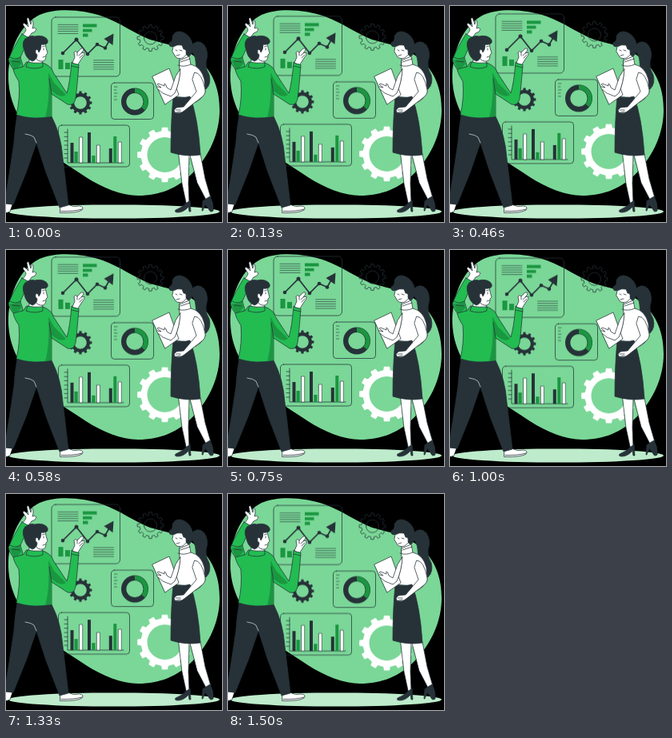
Write an HTML page that moves like this. It is 270 px wide and 270 px high and loops after 1540 ms.

```html
<!DOCTYPE html>
<html lang="en">
<head>
<meta charset="utf-8">
<title>Data presentation</title>
<style>
  html, body { margin: 0; width: 100%; height: 100%; overflow: hidden; background: #000; }
  svg { display: block; width: 100%; height: 100%; }
  .ink { fill: #263238; }
  .leaf { fill: #1b9641; }
  .shirt { fill: #22bc51; }
  .white { fill: #fff; }
  .none { fill: none; }
  .line { stroke: #263238; stroke-width: .75; stroke-linecap: round; stroke-linejoin: round; }
  .thin { stroke-width: .6; }
  .float { animation: float 1540ms linear -60ms infinite; }
  @keyframes float {
    0%, 100% { transform: translateY(.5px); }
    50% { transform: translateY(-6.4px); }
  }
</style>
</head>
<body>
<svg viewBox="0 0 270 270">
  <path fill="#7ad797" d="M3 85C4 53 18 23 42 11C62 2 96 4 121 13C143 21 158 33 180 42C202 48 226 52 244 70C261 86 267 108 267 130C267 158 255 186 234 208C215 228 192 237 165 237C145 237 120 227 100 214C76 198 52 184 34 164C15 141 2 116 3 85Z"/>
  <ellipse cx="135" cy="257" rx="132" ry="8.6" fill="#bdebcb"/>

  <g class="float">
    <path id="gearDark" class="ink" fill-rule="evenodd"/>
    <path id="gearWhite" class="white" fill-rule="evenodd"/>
    <path id="gearLine" class="none line"/>

    <rect class="none line" x="57" y="14" width="85.500" height="74" rx="5"/>
    <path class="none line thin" d="M65 23.300H90M65 26.100H90M65 28.900H90M65 31.700H90M65 34.500H90M109.500 67.800H134.500M109.500 70.600H134.500M109.500 73.400H134.500M109.500 76.200H134.500M109.500 79H134.500"/>
    <path class="leaf" d="M96 22.500H113.500V26.500H96ZM96 28.700H107.500V32.500H96ZM96 34.500H102.500V38.500H96ZM65.500 67H71.500V79H65.500ZM74 71H80V79H74Z"/>
    <path class="none" stroke="#263238" stroke-width="1.700" d="M71 59L88 42L102 60L114 48L124 52.500L131 40"/>
    <path class="ink" d="M134.500 34.500L122.500 41L133.500 49Z"/>
    <g class="ink">
      <circle cx="71" cy="59" r="2.300"/><circle cx="88" cy="42" r="2.500"/>
      <circle cx="102" cy="60" r="2.300"/><circle cx="114" cy="48" r="2.300"/>
      <circle cx="124" cy="52.500" r="2.300"/>
    </g>

    <rect class="none line" x="131.500" y="96" width="53" height="45.500" rx="4"/>
    <path class="none line thin" d="M135.500 101H139M135.500 105H138M135.500 109H139M135.500 113H138M135.500 117H138.500"/>
    <circle class="none" cx="161" cy="119.500" r="13.800" stroke="#263238" stroke-width="6.400"/>
    <path class="none" stroke="#1b9641" stroke-width="5.400" d="M161 105.700A13.800 13.800 0 0 1 171.500 128.500"/>

    <rect class="none line" x="65.500" y="149" width="89" height="52" rx="4"/>
    <path class="none line" d="M77 154V196H147M73 158H77M73 163.300H77M73 168.600H77M73 174H77M73 179.300H77M73 184.600H77M73 190H77"/>
    <path class="ink" d="M80.500 171H84.500V196H80.500ZM102 158H106V196H102ZM128.800 178H132.800V196H128.800Z"/>
    <path class="leaf" d="M85.500 182H89.800V196H85.500ZM107.300 187H111.500V196H107.300ZM134.300 163H138.300V196H134.300Z"/>
    <path class="white line thin" d="M92 164H95.700V196H92ZM113.700 174H117.400V196H113.700ZM140.600 170H144.300V196H140.600Z"/>
  </g>

  <g class="line">
    <path class="white" d="M0 246L8 248L5 257Q2 259-4 258V247Z"/>
    <path class="white" d="M68 250L77 248Q84 252 92 250Q98 251 95 255Q89 259 68 258.500Z"/>
    <path class="none" d="M69 256.500Q84 257 95 254"/>
    <path class="ink" d="M14 136L57 138Q69 161 71 190L78 249L67 252L50 208L38 171L26 206L9 248L-2 247Q5 205 10 170Q11 152 14 136Z"/>
    <path fill="none" stroke="#fff" stroke-width=".6" d="M24 160Q32 161 35 164L38 171"/>

    <path class="white" d="M20 37Q25 32 25 29L21 23Q22 20 25 23L28 26L26 16Q28 13 29 17L31 23L32 17Q34 17 34 24L33 28Q36 26 38 29Q37 33 32 34L27 41Z"/>
    <path class="shirt" d="M20 35L29 40L18 64L21 74L17 88L9 79Q4 73 3 67Q9 52 20 35Z"/>
    <path class="leaf" stroke="none" d="M4 67Q12 68 18 64L20 71Q14 80 9 78Z"/>
    <path class="none" d="M5 64Q11 68 18 64M8 69L17 70"/>
    <path class="white" d="M30 60L46 58L45 74Q36 77 29 71Z"/>
    <path class="white" d="M36 46L49 45L50 52L52 59L50 61Q50 68 46 69Q40 70 36 64Z"/>
    <path class="ink" d="M24 41Q30 36 36 38Q45 36 50 40Q54 44 51 47Q47 49 44 48Q44 55 41 58Q40 53 37 55Q36 59 39 61Q39 67 33 69Q25 66 23 56Q19 46 24 41Z"/>
    <path class="none" d="M47 53V55M45.500 51L48.500 50M46 64L49 63"/>
    <path class="shirt" d="M26 70Q36 72 46 71Q57 75 59 83L76 109Q80 96 82 70L91 73Q89 101 87 116Q85 125 77 123L57 110L57 138Q34 143 13 136Q18 115 16 94Q10 85 9 79L21 76Z"/>
    <path class="leaf" stroke="none" d="M53 83L60 96L75 111Q68 116 57 106V138L49 139Q55 119 53 83Z"/>
    <path class="none" d="M27 70L25 76Q36 80 46 76V71M57 110L54 91M82 75L91 77"/>
    <path class="white" d="M83 71L86 64L85 58Q87 55 89 58L94 53Q97 52 97 55L94 59L98 58Q99 61 95 65L90 73Z"/>
    <path class="none" d="M89 58L89 62M94 59L91 62M96 61L92 65"/>
  </g>

  <g class="line">
    <path class="ink" d="M231 50Q240 40 248 49Q254 58 250 70Q249 78 254 86Q257 97 250 104Q245 100 246 91Q237 82 237 69Q236 59 231 57Z"/>
    <path class="white" d="M216 185L229 185L228 222L229 246L226 250L220 222Z"/>
    <path class="white" d="M230 185L243 185L249 216L256 240L251 244L239 221Z"/>
    <path class="ink" d="M226 246L230 243L231 257H229L228 251Q222 258 215 258Q210 258 212 255Q220 252 226 246Z"/>
    <path class="ink" d="M250 241L255 238Q260 247 259 256Q255 259 253 253L249 248L246 256H245L246 244Z"/>
    <path class="white" d="M218 61L228 60L230 73L217 73Z"/>
    <path class="white" d="M210 48L221 44L228 55Q226 62 221 65Q213 67 211 62L208 57Z"/>
    <path class="ink" d="M211 50Q203 53 204 46Q209 44 208 38Q211 31 218 32Q228 34 232 44Q236 53 230 62Q226 64 225 59Q226 54 222 54L220 49Q214 48 211 50Z"/>
    <path class="none" d="M212 55L214 56M217 55L220 56M213 62L217 61"/>
    <path class="white" d="M217 68L229 63L231 73Q244 76 248 92L249 107Q245 118 233 122L230 115L209 113Q215 102 217 87Z"/>
    <path class="ink" d="M209 113Q219 116 230 113Q240 139 243 186Q225 189 206 183Q206 145 209 113Z"/>
    <path class="white" d="M183 88L204 78L216 111L199 123Z"/>
    <path class="white" d="M218 79Q217 96 211 109L206 113L196 109L190 104Q187 101 190 101L194 102L189 98Q190 96 193 98L198 100L198 97Q200 97 201 102L206 105L212 88Z"/>
    <path class="white" d="M236 83Q245 83 249 105Q250 111 242 116L224 130Q217 136 211 133L210 130L213 127L222 126L238 107L233 92Z"/>
    <path class="none" d="M215 74Q222 77 231 73M218 70L230 66M212 130L218 130M213 133L218 132"/>
  </g>
</svg>
<script>
  // Closed toothed outline plus a round hole.
  function gear(id, cx, cy, outer, root, hole, teeth) {
    const pitch = 2 * Math.PI / teeth;
    const at = (r, a) => (cx + r * Math.sin(a)).toFixed(2) + ' ' + (cy - r * Math.cos(a)).toFixed(2);
    const points = [];
    for (let i = 0; i < teeth; i++) {
      const a = i * pitch;
      points.push(at(root, a - pitch * .27), at(outer, a - pitch * .2),
                  at(outer, a + pitch * .2), at(root, a + pitch * .27));
    }
    const arc = `a${hole} ${hole} 0 1 0 `;
    document.getElementById(id).setAttribute('d',
      `M${points.join('L')}ZM${cx - hole} ${cy}${arc}${2 * hole} 0${arc}${-2 * hole} 0Z`);
  }
  gear('gearDark', 93, 121, 14.5, 12, 7.8, 12);
  gear('gearWhite', 198.5, 186, 34.5, 30, 22, 12);
  gear('gearLine', 180.5, 40, 16.5, 13.5, 8, 12);
</script>
</body>
</html>
```
